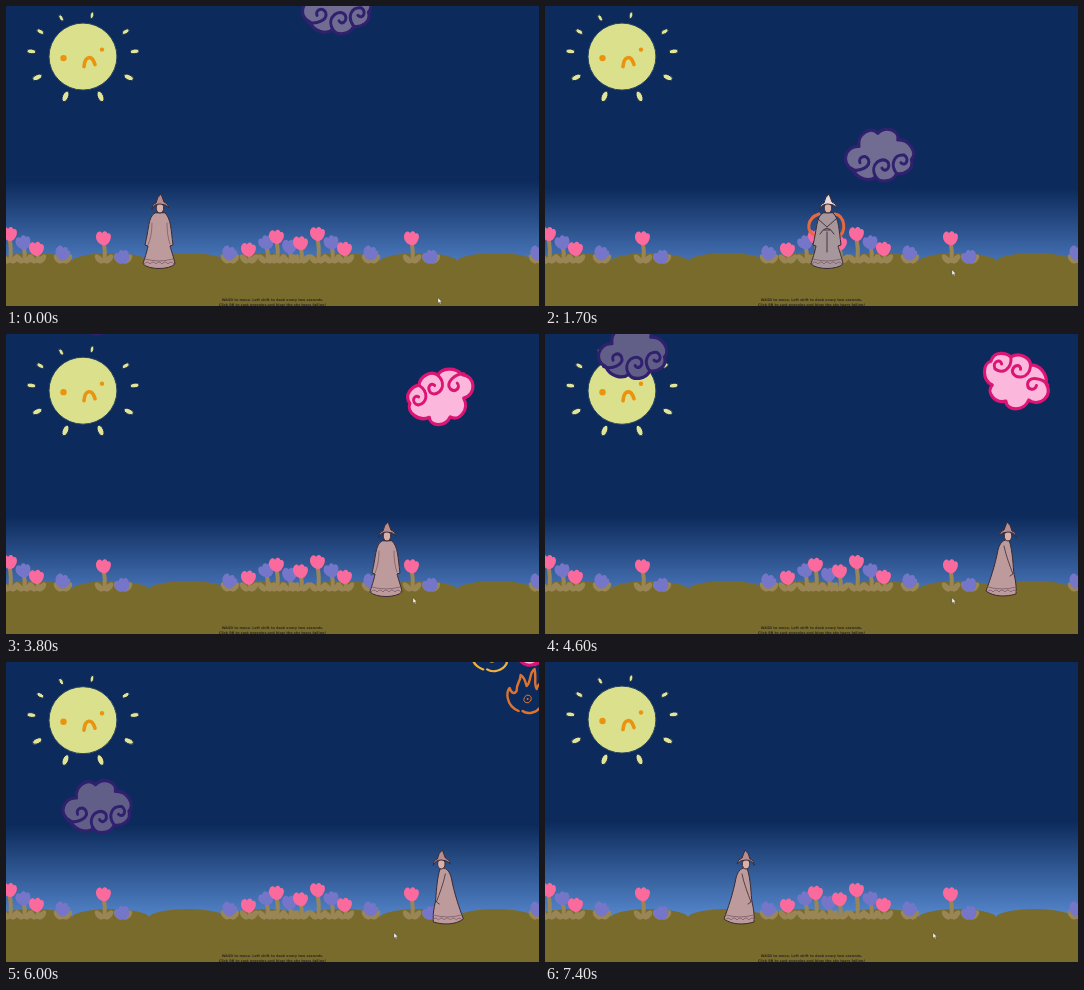
Animation, 533 px wide and 300 px high, one loop 7.5 s. Source, as an HTML page with a canvas:

```html
<!DOCTYPE html>
<html>
<head>
<meta charset="utf-8">
<style>
  html, body { margin: 0; height: 100%; overflow: hidden; background: #0c2a5b; }
  canvas { display: block; }
</style>
</head>
<body>
<canvas id="stage" width="533" height="300"></canvas>
<script>
const c = document.getElementById('stage').getContext('2d');
const LOOP = 7500, TILE = 308;
const { sin, cos, abs, min, sqrt, PI } = Math;
const INK = '#3b2a32', PINK = '#fb6a9d', BLUE = '#7576c8', STEM = '#9a8655', GROUND = '#786b2b';
const ROBE = '#bd9b9d', SKIN = '#d8b1aa', FOLD = '#7b5d68', ORANGE = '#ea930f';

function shape(d, fill, stroke, width = 1) {
  const p = new Path2D(d);
  if (fill) { c.fillStyle = fill; c.fill(p); }
  if (stroke) { c.strokeStyle = stroke; c.lineWidth = width; c.stroke(p); }
}

function oval(x, y, rx, ry, fill, turn = 0, stroke) {
  c.beginPath();
  c.ellipse(x, y, rx, ry, turn, 0, 7);
  c.fillStyle = fill;
  c.fill();
  if (stroke) { c.strokeStyle = stroke; c.lineWidth = 1; c.stroke(); }
}

function at(x, y, draw, turn = 0, sx = 1, sy = sx) {
  c.save();
  c.translate(x, y);
  c.rotate(turn);
  c.scale(sx, sy);
  draw();
  c.restore();
}

// Linear interpolation through [time, value] pairs
function track(t, keys) {
  const i = keys.findIndex(k => k[0] > t);
  if (i < 0) return keys[keys.length - 1][1];
  if (!i) return keys[0][1];
  const [t0, a] = keys[i - 1], [t1, b] = keys[i];
  return a + (b - a) * (t - t0) / (t1 - t0);
}

function sky(t) {
  const light = track(t, [[0, .2], [.9, 0], [5.8, 0], [6.2, 1], [6.8, 1], [7.1, .6]]);
  const g = c.createLinearGradient(0, 182 - 38 * light, 0, 254);
  g.addColorStop(0, '#0c2a5b');
  g.addColorStop(1, `rgb(${68 + 26 * light}, ${112 + 36 * light}, ${178 + 42 * light})`);
  c.fillStyle = g;
  c.fillRect(0, 0, 533, 300);
}

function sun(t) {
  const bob = -cos(2 * PI * (t - 1.65) / .79) * (t < 3.4 ? 5.8 : 1.2);
  at(77, 55.5 + t / 4 + bob, () => {
    for (let i = 0; i < 10; i++) {
      const a = i * PI / 5 - .2 * cos((i - 1) * PI / 3);
      const r = 47 + 5 * cos(2 * a), size = 1 + .25 * sin(a);
      oval(r * cos(a), r * sin(a), 4.6 * size, 2.4 * size, '#e0e59a', a, '#12284e');
    }
    oval(0, 0, 34, 33.5, '#dbe08c', 0, '#27435f');
    oval(-19.5, 1.5, 3.2, 3.2, ORANGE);
    oval(19, -7, 2.2, 2.2, ORANGE);
    shape('M1 10C2 -1 9 -2 12 8', null, ORANGE, 3.6);
  });
}

function hills() {
  c.beginPath();
  c.moveTo(0, 300);
  for (let x = 0; x <= 533; x++) c.lineTo(x, 255 - 8 * sqrt(abs(sin(PI * (x + 11) * 4 / TILE))));
  c.lineTo(533, 300);
  c.fillStyle = GROUND;
  c.fill();
}

function flower(x, y, color, lean) {
  const foot = 257;
  shape(`M${x} ${y + 3}Q${x + 3} ${(y + foot) / 2} ${x + 1} ${foot - 2}`, null, STEM, 4);
  for (const side of [-1, 1]) oval(x + 1 + 5 * side, foot - 4, 3, 5.5, STEM, .7 * side);
  at(x, y, () => shape('M1 7C-5 6 -8 1 -7 -3C-6 -7 -3 -7 -1.5 -5C0 -8 3 -8 4 -5C7 -7 9 -2 7 2C6 5 4 7 1 7Z', color), lean);
}

const beds = [3, 17, 30, 56, 97, 116, 223, 242, 260, 270, 283, 294];

function garden() {
  hills();
  for (const left of [-TILE, 0, TILE]) beds.forEach((x, i) => {
    const pink = (i % 2 === 0) === (i < 6);
    if (pink) flower(left + x, 236 - 8 * cos(1.3 * i), PINK, .1);
    else flower(left + x, 244 + 8 * cos(.78 * (i - 4.5)), BLUE, .5 * cos(2 * i));
  });
}

function cloud(x, y, turn, fill, line) {
  at(x, y, () => {
    shape('M-26 13C-38 8 -33 -9 -20 -8C-22 -20 -8 -27 -2 -20C6 -28 19 -22 17 -14C28 -15 36 -2 30 4C33 14 22 18 16 17C12 25 0 26 -4 20C-10 25 -22 22 -26 13Z', fill, line, 3);
    shape('M-28 13C-20 16 -8 11 -11 4C-14 -1 -21 2 -19 7M-4 20C-11 8 3 0 8 7C10 13 4 16 2 12M16 17C9 8 14 -1 23 0C29 4 24 11 20 7', null, line, 2.8);
  }, turn, 1.05, 1.09);
}

const fall = age => -26 + 43 * age + 15.7 * age * age;

function clouds(t) {
  const line = '#30216f', hit = 1.95;
  if (t < hit) cloud(331 + 2.3 * t, fall(t + .54), 0, '#706c92', line);
  else if (t < 6.1) {
    const x = track(t, [[hit, 335], [2.8, 403], [3.8, 435], [6.1, 537]]);
    const y = track(t, [[hit, 167], [2.8, 55], [3.8, 63], [5.4, 32], [6.1, -40]]);
    cloud(x, y, 1.12 * (t - 1.3), '#fcb7dc', '#dc1473');
  }
  if (t > 3.7 && t < 6.9) cloud(90 + 2.5 * (t - 5.4), fall(t - 3.8), 0, '#615e88', line);
}

const path = [[.6, 153], [1.45, 282], [1.7, 282], [2.8, 453], [3.2, 453], [3.65, 380],
  [4.1, 380], [5.1, 534], [5.55, 534], [7.25, 184], [7.4, 195]];

function fireballs(t) {
  [2.26, 4.77, 5].forEach((start, i) => {
    if (t < start) return;
    const color = i % 2 ? '#efb23e' : '#dd742d';
    at(track(start, path), 200 - 170 * (t - start), () => {
      shape('M-6 19C-20 13 -18 -2 -15 -4C-13 2 -10 2 -8 -1C-8 -10 -4 -10 -4 -17C1 -14 1 -8 2 -6C7 -10 4 -19 10 -23C12 -12 9 -8 12 -3C13 -7 15 -8 16 -9C14 0 20 6 17 13C13 21 3 23 -2 19', null, color, 2.4);
      oval(3, 7, 3.5, 4, 'transparent', .4, color);
      oval(3, 7, 1, 1, color);
    }, 0, 1, i % 2 ? .87 : 1);
  });
}

function hat(x, fill = '#b58d92') {
  oval(x, -60, 3.8, 5, SKIN, 0, INK);
  at(x, 0, () => shape('M-8 -59Q-8 -64 -4 -65Q-3 -71 1 -74L4 -66Q8 -65 9 -60Q6 -64 0 -64T-8 -59Z', fill, INK));
}

function robe(fill) {
  shape('M-4 -55C-11 -52 -10 -38 -14 -23L-11 -22C-12 -16 -15 -8 -16 -4C-10 2 10 2 16 -4C15 -10 12 -18 11 -22L14 -23C12 -38 12 -50 6 -55Z', fill, INK);
}

function hem() {
  shape('M-14 -9Q0 -5 14 -9M-15 -4' + 'q3 -4 6 0'.repeat(5), null, FOLD, .8);
}

const poses = {
  front() {
    robe(ROBE);
    shape('M-7 -45Q-7 -32 -11 -23M8 -45Q8 -32 11 -24', null, FOLD, .8);
    hem();
    hat(1);
  },
  side() {
    shape('M-7 -56C-11 -45 -11 -28 -12 -22C-15 -10 -14 -4 -14 -2C-4 1 8 1 16 -5C12 -16 7 -30 4 -46C2 -54 -2 -57 -7 -56Z', ROBE, INK);
    shape('M-2 -50C-4 -40 -8 -30 -11 -22l3 2', null, INK, .8);
    hem();
    hat(-6);
  },
  charge() {
    shape('M-8 -54C-20 -50 -22 -36 -11 -32M8 -54C18 -52 20 -36 11 -31', null, '#e8683d', 3);
    robe('#a6979c');
    shape('M-9 -49L0 -41L9 -49M-7 -34Q0 -46 7 -34M-3 -38h6M0 -36v20', null, INK, .9);
    hem();
    hat(1, '#e6dde0');
  },
  cast() {
    shape('M-15 -66L-21 -69M16 -66L24 -70', null, SKIN, 2);
    shape('M-4 -60L-15 -67L-19 -54L-8 -52C-9 -40 -12 -30 -14 -22L-20 -5C-10 2 8 1 15 -4L9 -40L8 -52L18 -52L16 -67L5 -60Z', ROBE, INK);
    oval(0, -66, 6.5, 6, '#b18f95', 0, INK);
    oval(0, -64, 4, 4.5, '#20315c');
    hem();
  }
};

function walker(t) {
  const within = (a, b) => t >= a && t < b;
  const step = track(t + .05, path) - track(t - .05, path);
  const pose = within(1.45, 1.85) ? 'charge'
    : within(2.1, 2.5) || within(2.65, 3.05) || within(4.65, 5.5) ? 'cast'
    : abs(step) > .5 ? 'side' : 'front';
  at(track(t, path), 262, poses[pose], 0, pose === 'side' && step > 0 ? -1 : 1, 1);
}

function hints() {
  c.fillStyle = '#2e2a1e';
  c.textAlign = 'center';
  c.font = 'bold 3.4px "DejaVu Sans", sans-serif';
  c.fillText('WASD to move. Left shift to dash every two seconds.', 266.5, 295.3);
  c.fillText('Click RB to cast energies and blow the sky tears falling!', 266.5, 299.5);
}

function cursor(t) {
  const x = track(t, [[.6, 432], [1.2, 407], [5.4, 407], [5.8, 388]]);
  const y = track(t, [[.6, 292], [1.2, 264], [5.4, 264], [5.8, 271]]);
  at(x, y, () => shape('M0 0V5L1.3 4L2.2 6L3 5.6L2.2 3.7H3.8Z', '#f4f1f4', '#4b4532', .3));
}

const scene = [sky, sun, garden, clouds, fireballs, walker, hints, cursor];
const began = performance.now();

function frame() {
  const t = Math.floor((performance.now() - began) % LOOP / 100) / 10;
  c.lineCap = c.lineJoin = 'round';
  scene.forEach(draw => draw(t));
  requestAnimationFrame(frame);
}

frame();
</script>
</body>
</html>
```
